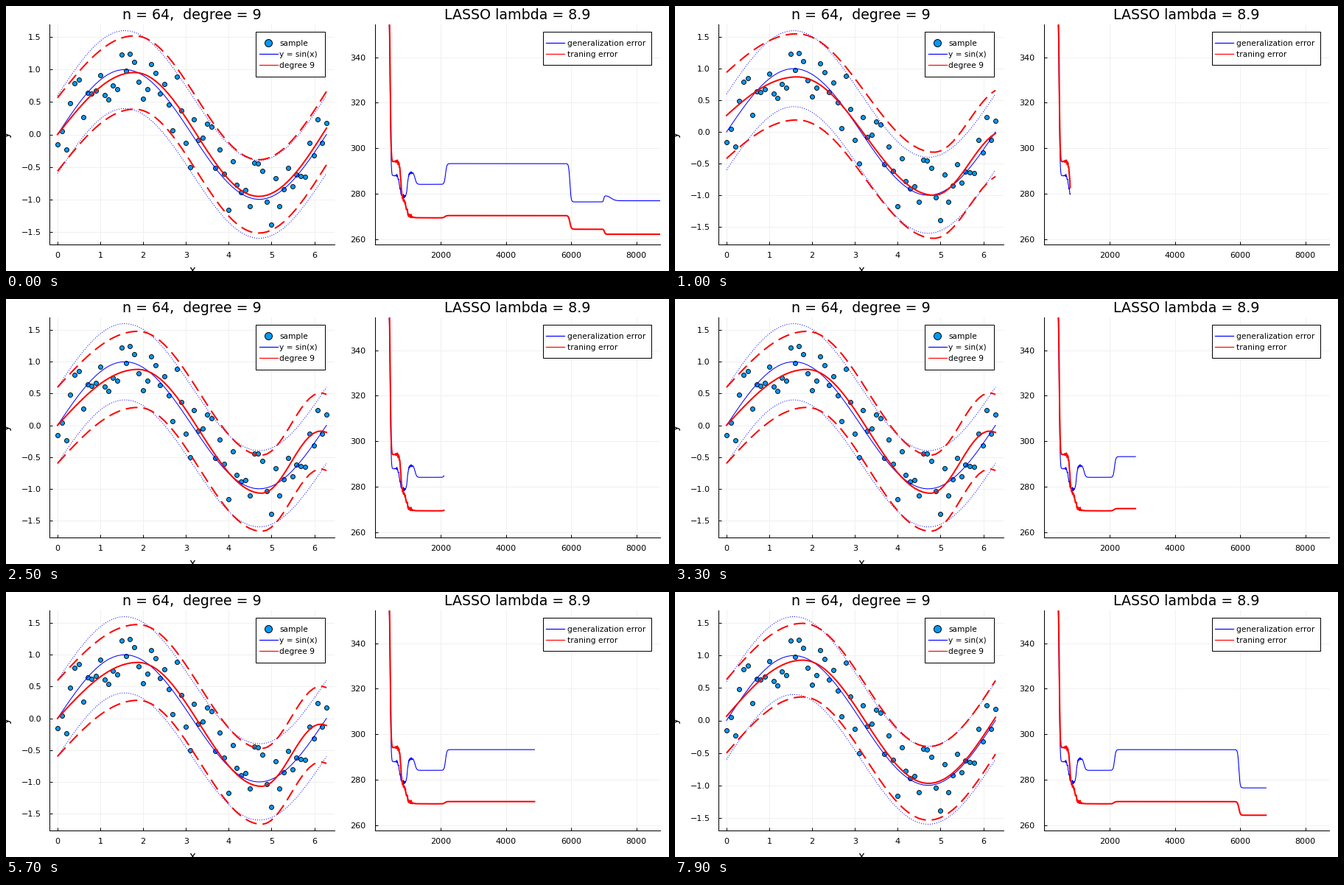
These frames come from a looping animation (900x360 px, 8000 ms). A matplotlib script:

```python
import numpy as np
import matplotlib.pyplot as plt
from matplotlib.animation import FuncAnimation
from matplotlib.patches import Rectangle

W, H = 900, 360
FRAMES, STEP, LAST = 80, 87, 101
BLUE, RED, DOT = "blue", "red", "#009af9"

plt.rcParams.update({"font.family": "DejaVu Sans", "font.size": 10.6})
rng = np.random.default_rng(64)

# --- samples and fitted curves --------------------------------------------
x = np.linspace(0, 2 * np.pi, 64)
truth = np.sin(x)
sample = truth + np.clip(rng.normal(0, .3, x.size), -.55, .55)


def wave(*turns):
    """Cosine arcs through turning points; the outer ones may lie off stage."""
    px, py = np.array(turns).T
    i = np.clip(np.searchsorted(px, x) - 1, 0, len(px) - 2)
    t = (x - px[i]) / (px[i + 1] - px[i])
    return py[i] + (py[i + 1] - py[i]) * (1 - np.cos(np.pi * t)) / 2


z = x / (2 * np.pi)
flat = .01 - 3.76 * z ** 5 + 4.22 * z ** 10.4
early = wave((-2.1, -.63), (1.65, .87), (4.85, -1), (6.5, .02))
settled = wave((-1.88, -.88), (1.88, .88), (4.77, -1.07), (6.15, -.09))
better = wave((-1.78, -.8), (1.78, .93), (4.72, -.97), (7.85, 1.07))
final = wave((-1.8, -.955), (1.8, .955), (4.7, -.955), (7.87, 1.155))

# (step, curve, half width of the band)
KEYS = [(1, flat, 2), (3, flat, 2), (9, early, .9), (10, early, .68),
        (15, settled, .6), (67, settled, .595), (71, better, .567),
        (80, better, .567), (LAST, final, .565)]


def fit_at(n):
    for (a, fa, wa), (b, fb, wb) in zip(KEYS, KEYS[1:]):
        if n <= b:
            t = (n - a) / (b - a)
            return fa + (fb - fa) * t, wa + (wb - wa) * t


# --- error histories: steep descent, then smooth jumps --------------------
it = np.arange(420, 8740, 7)
jitter = .5 * np.exp(-((it - 880) / 260) ** 4)


def history(level, *jumps):
    y = level + 66 * np.exp(-((it - 420) / 42) ** 2)
    for size, centre, width in jumps:
        y += size * (1 + np.tanh((it - centre) / (2 * width))) / 2
    return y + jitter * rng.normal(0, 1, it.size)


gen = history(288, (-9, 740, 22), (10.5, 985, 18), (-5.3, 1215, 25),
              (9.1, 2150, 20), (-16.8, 5965, 18), (2.8, 7005, 12),
              (-2.3, 7230, 60))
train = history(294.2, (-16.2, 775, 20), (-8, 950, 32), (-.5, 1150, 60),
                (1, 2130, 25), (-6, 5965, 22), (-2.2, 7025, 15))

# --- stage: one point equals one pixel ------------------------------------
fig = plt.figure(figsize=(W / 72, H / 72), dpi=72, facecolor="white")


def panel(title, xlim, pad):
    ax = fig.add_axes([0, 0, 1, 1])
    ax.set_xlim(*xlim)
    ax.spines[["top", "right"]].set_visible(False)
    ax.spines[["left", "bottom"]].set_linewidth(1)
    ax.set_axisbelow(True)
    ax.grid(color="#f0f0f0", lw=1)
    ax.tick_params(direction="in", length=4, width=1, labelsize=11.1)
    ax.tick_params(axis="x", pad=9.5)
    ax.tick_params(axis="y", pad=pad)
    ax.set_title(title, fontsize=19, pad=7.5)
    return ax


def place(ax, left, right):
    ax.set_position([left / W, 36 / H, (right - left) / W, 299 / H])


def legend(box, text_dx, rows):
    ax = fig.add_axes([0, 0, 1, 1], zorder=5)
    ax.set(xlim=(0, W), ylim=(H, 0))
    ax.axis("off")
    left, top, right, bottom = box
    ax.add_patch(Rectangle((left, top), right - left, bottom - top,
                           fc="white", ec="black", lw=1))
    for i, (label, color) in enumerate(rows):
        y = top + 15 + 15.1 * i
        if color == DOT:
            ax.plot(left + 17, y, "o", ms=10, mfc=DOT, mec="black", mew=1)
        else:
            ax.plot([left + 4.5, left + 29.5], [y, y], color=color, lw=1.2)
        ax.text(left + text_dx, y + 4, label, va="baseline")
    return ax


fit_ax = panel("n = 64,  degree = 9", (-.06 * np.pi, 2.06 * np.pi), 11.4)
err_ax = panel("LASSO lambda = 8.9", (0, 8734), 13)
fit_ax.set_xticks(range(7))
err_ax.set_xticks(range(2000, 8001, 2000))
err_ax.set_yticks(range(260, 341, 20))
err_ax.set_ylim(257.8, 354.4)

fit_ax.plot(x, sample, "o", ms=6, mfc=DOT, mec="black", mew=.9)
fit_ax.plot(x, truth, color=BLUE, lw=1)
for d in (-.6, .6):
    fit_ax.plot(x, truth + d, color=BLUE, lw=1, ls=(0, (1, 2)))
fit_line, = fit_ax.plot([], [], color=RED, lw=2)
bands = [fit_ax.plot([], [], color=RED, lw=2, ls=(0, (8, 4)))[0]
         for _ in range(2)]
gen_line, = err_ax.plot([], [], color=BLUE, lw=1.1)
train_line, = err_ax.plot([], [], color=RED, lw=2)

fit_ax.text(.5, -39.5 / 299, "x", fontsize=14.9, ha="center", va="baseline",
            transform=fit_ax.transAxes)
fig.text(4.4 / W, 1 - 174.5 / H, "y", fontsize=14.9, rotation=90,
         rotation_mode="anchor", ha="center", va="baseline")

fit_key = legend((339, 35, 433, 95.5), 32,
                 [("sample", DOT), ("y = sin(x)", BLUE), ("degree 9", RED)])
legend((728.5, 35, 875.5, 80), 33.3,
       [("generalization error", BLUE), ("traning error", RED)])


def draw(frame):
    n = frame or LAST
    fit, half = fit_at(n)
    fit_line.set_data(x, fit)
    for band, sign in zip(bands, (-1, 1)):
        band.set_data(x, fit + sign * half)

    lo = min(-1.6, (fit - half).min())
    hi = max(1.6, (fit + half).max())
    margin = .03 * (hi - lo)
    lo, hi = lo - margin, hi + margin
    fit_ax.set_ylim(lo, hi)

    # Coarse ticks have shorter labels, so both panels widen
    coarse = hi - lo > 3.6
    step, digits = (1, 0) if coarse else (.5, 1)
    ticks = np.arange(np.ceil(lo / step), np.floor(hi / step) + 1) * step + 0.0
    labels = [f"{t:.{digits}f}".replace("-", "\u2212") for t in ticks]
    fit_ax.set_yticks(ticks, labels)
    place(fit_ax, *((49.8, 440.6) if coarse else (59, 446)))
    place(err_ax, 496.7 if coarse else 501.5, 888)
    fit_key.set_position([-5.2 / W if coarse else 0, 0, 1, 1])

    shown = it <= STEP * (n - 1) + 12 + (n == LAST) * STEP
    gen_line.set_data(it[shown], gen[shown])
    train_line.set_data(it[shown], train[shown])
    return []


anim = FuncAnimation(fig, draw, frames=FRAMES, interval=100, repeat=True,
                     repeat_delay=0, init_func=lambda: [], blit=False)
plt.show()
```
